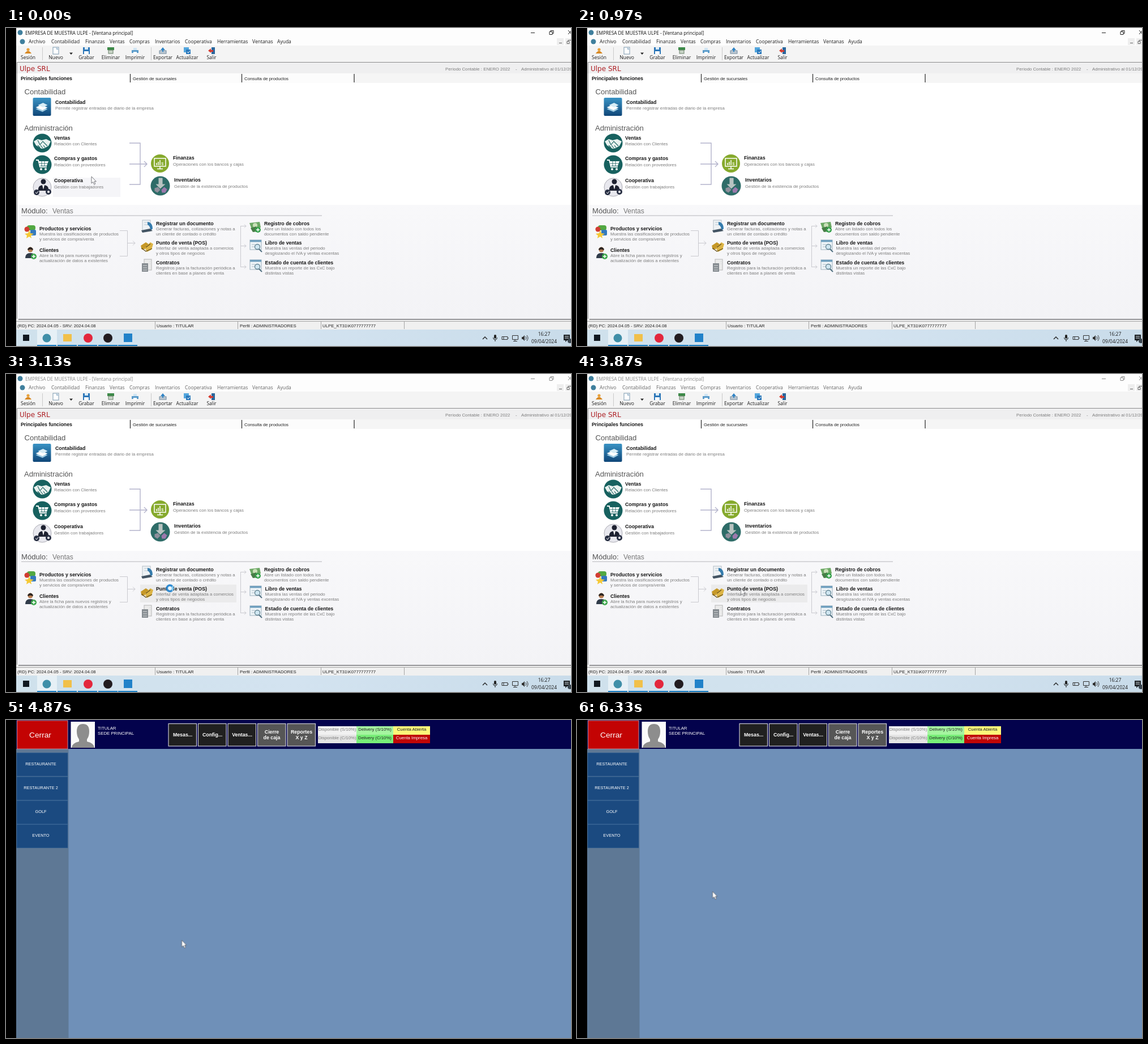
Write an HTML page that moves like this. It is 998 by 561 pixels and loops after 6.36 s.

```html
<!DOCTYPE html>
<html lang="es">
<head>
<meta charset="utf-8">
<title>Punto de venta</title>
<style>
html, body { margin: 0; width: 100%; height: 100%; overflow: hidden; background: #000; }
svg { display: block; width: 998px; height: 561px; }
text { font: 7.8px "Liberation Sans", Arial, sans-serif; fill: #222; white-space: pre; }
.ui { font: 8.5px "Open Sans", sans-serif; fill: #1c1c1c; }
.ttl { font: 8.25px "Open Sans", sans-serif; fill: #111; }
.off .ttl { fill: #8c8c8c; }
.off .ui { fill: #666; }
.b { font-weight: bold; font-size: 8.8px; fill: #161616; }
.d { fill: #7d7d7d; }
.h { font-size: 13.1px; fill: #555; }
.m { font-size: 12px; fill: #777; }
.co { font: 12px "DejaVu Sans", sans-serif; fill: #ad1f24; }
.w { fill: #fff; }
.c { text-anchor: middle; }
.big { font-size: 13.7px; }
.nav { font-size: 7.4px; }

.on { animation: 6360ms step-end infinite; }
#desk { animation-name: desk; }
#pos { animation-name: pos; }
#hot1 { animation-name: hot1; }
#hot2 { animation-name: hot2; }
#live { animation-name: live; }
#idle { animation-name: idle; }
#busy { animation-name: busy; }
#arrow { animation-name: arrow; }
#move { animation: move 6360ms linear infinite; }
#ring { animation: turn 1000ms linear infinite; }
@keyframes desk { 0% { visibility: visible } 61.8%, 100% { visibility: hidden } }
@keyframes pos { 0% { visibility: hidden } 61.8%, 100% { visibility: visible } }
@keyframes hot1 { 0% { opacity: 1 } 2.4%, 100% { opacity: 0 } }
@keyframes hot2 { 0% { opacity: 0 } 29.4%, 100% { opacity: 1 } }
@keyframes live { 0% { opacity: 1 } 42.4%, 100% { opacity: 0 } }
@keyframes idle { 0% { opacity: 0 } 42.4%, 100% { opacity: 1 } }
@keyframes busy { 0% { opacity: 0 } 37.1% { opacity: 1 } 57.4%, 100% { opacity: 0 } }
@keyframes arrow { 0% { opacity: 1 } 10.1% { opacity: 0 } 20.9% { opacity: 1 } 37.1% { opacity: 0 } 57.4%, 100% { opacity: 1 } }
@keyframes move {
  0%, .5% { transform: translate(151px, 262px); animation-timing-function: ease-in-out }
  10.1% { transform: translate(412px, 243px) }
  20.9% { transform: translate(372px, 318px); animation-timing-function: ease-out }
  31%, 62.6% { transform: translate(289.5px, 378px); animation-timing-function: ease-in-out }
  76.5%, 79% { transform: translate(310.5px, 388.5px); animation-timing-function: ease-in-out }
  99%, 100% { transform: translate(239.5px, 302.5px) }
}
@keyframes turn { to { transform: rotate(360deg) } }
</style>
</head>
<body>
<svg id="stage" viewBox="0 0 998 561">
<defs>
  <linearGradient id="blue" x2="0" y2="1"><stop stop-color="#3a93c4"/><stop offset="1" stop-color="#0f4678"/></linearGradient>
  <linearGradient id="task"><stop stop-color="#cfe1ec"/><stop offset=".5" stop-color="#d3e3f0"/><stop offset="1" stop-color="#c9dcea"/></linearGradient>
  <linearGradient id="low" x2="0" y2="1"><stop stop-color="#f8f8fa"/><stop offset="1" stop-color="#f3f3f6"/></linearGradient>
</defs>
</svg>
<script>
const rect = (x, y, w, h, fill, more = '') => `<rect x="${x}" y="${y}" width="${w}" height="${h}" fill="${fill}" ${more}/>`;
const dot = (x, y, r, fill, more = '') => `<circle cx="${x}" cy="${y}" r="${r}" fill="${fill}" ${more}/>`;
const shape = (d, fill, more = '') => `<path d="${d}" fill="${fill}" ${more}/>`;
const line = (d, color, w = 1) => shape(d, 'none', `stroke="${color}" stroke-width="${w}"`);
const text = (x, y, s, cls = '') => `<text x="${x}" y="${y}" class="${cls}">${s}</text>`;
const at = (x, y, s) => `<g transform="translate(${x} ${y})">${s}</g>`;
const group = (id, s, cls = '') => `<g id="${id}" class="on ${cls}">${s}</g>`;

// Bold heading with grey lines below
const entry = (x, y, head, ...rows) =>
  text(x, y, head, 'b') + rows.map((s, i) => text(x, y + (rows.length > 1 ? 9 + i * 9.5 : 10.5), s, 'd')).join('');

const sheet = rect(-5, -6, 10, 12, '#fff', 'stroke="#7d99b0"') + shape('M1 -6L5 -2H1Z', '#9db9cf');
const tools = [
  [39, 'Sesión', dot(0, -2, 2.6, '#e8a23c') + shape('M-6 5Q0 -4 6 5Z', '#d88924')],
  [88, 'Nuevo', sheet],
  [142, 'Grabar', rect(-6, -6, 12, 12, '#2d77b8') + rect(-3, -6, 6, 4, '#d9ebf7') + rect(-4, 1, 8, 5, '#fff')],
  [185, 'Eliminar', rect(-6, -6, 12, 5, '#3d8a48') + rect(-4, -1, 8, 6, '#c9d4c6', 'stroke="#68806a"')],
  [228, 'Imprimir', rect(-3, -5, 6, 4, '#cfe5f3') + rect(-6, -1, 12, 5, '#5c9cca') + rect(-3, 2, 6, 4, '#fff')],
  [277, 'Exportar', rect(-6, 0, 12, 5, '#bcc8d2', 'stroke="#72899c"') + shape('M-4 -1L0 -6L4 -1H1V2H-1V-1Z', '#2e83c5')],
  [320, 'Actualizar', rect(-6, -6, 9, 9, '#53a6dd') + rect(-2, -2, 8, 8, '#2b78bb') + line('M0 2L2 4L5 0', '#fff')],
  [363, 'Salir', rect(0, -6, 6, 12, '#2b679d') + shape('M-6 0L-1 -4V-1H3V2H-1V4Z', '#d83a2e')]
];

const menu = [[40, 'Archivo'], [80, 'Contabilidad'], [140, 'Finanzas'], [183, 'Ventas'], [218, 'Compras'], [263, 'Inventarios'],
  [316, 'Cooperativa'], [373, 'Herramientas'], [435, 'Ventanas'], [479, 'Ayuda']];

const caption = color =>
  text(34, 11.5, 'EMPRESA DE MUESTRA ULPE - [Ventana principal]', 'ttl') +
  line('M927 8.5H934M960 6.5H965V11.5H960ZM962 6.5V4.5H967V9.5H965M993 4L999 11M999 4L993 11', color) +
  menu.map(([x, s]) => text(x, 27, s, 'ui')).join('');

const header =
  rect(18, 0, 980, 31, '#fdfdfd') + rect(18, 31, 980, 29, '#f4f4f4') + rect(18, 60, 980, 20, '#efeff0') +
  rect(18, 80, 980, 17, '#f5f5f5') + rect(18, 80, 201, 17, '#fff') + rect(219, 80, 396, 17, '#fcfcfc') +
  dot(25, 8, 4.5, '#3f7f9d') + dot(29, 24, 4.5, '#3f7f9d') +
  group('live', caption('#222')) + group('idle', caption('#8c8c8c'), 'off') +
  rect(973, 18, 12, 12, '#eee') + rect(988, 18, 10, 12, '#eee') +
  line('M977 26.5H982M991 23.5H995V27.5H991ZM993 23V21.5H998', '#666') +
  tools.map(([x, s, icon]) => at(x, 40, icon) + text(x, 54.5, s, 'ui c')).join('') +
  shape('M112 43.5H118L115 47Z', '#222') + line('M64.5 34V57M256.5 34V57', '#c9c9c9') +
  text(24, 75.5, 'Ulpe SRL', 'co') +
  text(776, 74.5, 'Período Contable : ENERO 2022', 'd') + text(900, 74.5, '-', 'd') + text(910, 74.5, 'Administrativo al 01/12/2022', 'd') +
  text(26, 92, 'Principales funciones', 'b') + text(224, 92, 'Gestión de sucursales') + text(421, 92, 'Consulta de productos') +
  line('M219.5 81V96M416.5 81V96M615 81V96', '#333', 1.3);

const icons =
  rect(47.5, 123, 32, 32, 'url(#blue)', 'rx="2"') +
  at(63.5, 139, shape('M-11 4L-2 0L10 4L1 9Z', '#9fcbe2') + shape('M-11 1L-2 -3L10 1L1 6Z', '#fff') + shape('M-7 -3L2 -7L10 -3L2 1Z', '#d8edf6')) +
  at(64, 203, dot(0, 0, 16.5, '#17615f') + shape('M-15 -3L-8 -7L-1 -5L7 -7L15 -3L11 5L4 9L-1 10L-11 4Z', '#e9f1ef') +
    line('M-8 -5L-4 3L1 -3L9 5M-8 4L-4 8M-3 4L1 9M2 4L5 8', '#17615f', 1.1)) +
  at(64, 241, dot(0, 0, 16.5, '#17615f') + line('M-11 -8H-7L-4 4H8', '#fff', 1.8) + shape('M-7 -6H11L8 2H-4Z', '#fff') +
    line('M-6 -2H10M-1 -6V2M4 -6V2', '#17615f', .8) + dot(-2, 8, 2, '#fff') + dot(6, 8, 2, '#fff')) +
  at(64, 281, dot(0, 0, 16, '#e8e8ee', 'stroke="#aaaab2"') + dot(2, -10, 4.5, '#1d2130') + shape('M-7 6Q-8 -4 2 -4Q12 -4 11 6Z', '#1d2130') +
    shape('M0 -4H4L2 4Z', '#fff') + dot(-10, 9, 5, '#2a3145') + line('M-12 9L-10 11L-7 7', '#fff') + dot(11, 8, 5, '#2a3145') + dot(11, 8, 2, '#fff')) +
  at(272, 239, dot(0, 0, 16, '#86aa2d') + rect(-10, -9, 20, 14, 'none', 'stroke="#fff" stroke-width="1.5"') +
    line('M-6 3V-1M-3 3V-3M0 3V-6M0 5V9M-5 9.5H5', '#fff', 1.5) + text(2, 3, '$', 'w')) +
  at(272.5, 278.5, dot(0, 0, 17, '#2e6c68') + shape('M-3 -14H4V-3H9L0 5L-8 -3H-3Z', '#b8c3c1') +
    shape('M-10 4L-4 2L0 7L-5 12L-10 9Z', '#8f8f9c') + shape('M2 7L7 2L12 6L9 12L3 12Z', '#9c79ac')) +
  at(43, 359, rect(-6, -11, 15, 9, '#52a842', 'rx="4"') + rect(0, -3, 10, 10, '#3479bd', 'rx="2"') + dot(-6, -4, 4.5, '#d23c32') +
    shape('M-2 -2L0 3L6 4L1 7L2 12L-2 9L-7 12L-6 7L-10 4L-4 3Z', '#f5c936')) +
  at(43, 397, dot(0, -6, 4.5, '#b87c50') + shape('M-5 -7Q0 -14 5 -7L4 -5Q0 -8 -4 -5Z', '#282321') + shape('M-9 9Q-9 0 0 0Q9 0 9 9Z', '#303b49') +
    dot(6, 6, 5, '#3ba64a') + line('M3 6H9M6 3V9', '#fff', 1.5)) +
  at(249, 350, rect(-8, -11, 14, 19, '#eef2f5', 'stroke="#b3bec6"') + line('M-5 -7H2M-5 -3H2', '#b6c3cc') +
    shape('M1 -8Q10 -7 10 4L6 8Q6 -1 1 -3Z', '#357cad') + shape('M-10 7L5 4L10 8L-8 11Z', '#435463')) +
  at(249, 386, shape('M-11 -2L-2 -8L4 -4L-4 4L-9 5Z', '#c69827') + shape('M-4 2L6 -8L11 -5L8 5L0 9Z', '#dcb445') + line('M-10 2L-2 8L9 3M-2 1L6 -5', '#66501a', 1.2)) +
  at(249, 419, rect(-5, -11, 13, 19, '#ebebeb', 'stroke="#b5b5b5"') + rect(-9, -4, 11, 15, '#868c91') + line('M-7 0H0M-7 4H0M-7 8H0M4 -7H8M4 -3H8', '#d9dcde', 1.2)) +
  at(440, 351, shape('M-10 -7L8 -9L10 1L-6 4Z', '#6ca864') + dot(0, -3, 4, '#c9dfb8') + shape('M-8 2L2 -1L4 8L-4 9Z', '#487d47') + dot(5, 5, 5, '#35a14a') + line('M2 5H8M5 2V8', '#fff', 1.4)) +
  [384, 419].map(y => at(441, y, rect(-10, -10, 20, 17, '#eef4f8', 'stroke="#9aaebb"') + rect(-10, -10, 20, 3.5, '#6f9fbe') +
    line('M-7 -2H-1M-7 2H-1', '#a9bac5') + dot(3, 2, 4.5, '#cfe6f1', 'stroke="#60808f" stroke-width="1.3"') + line('M6 6L11 11', '#506f80', 2))).join('');

const content =
  rect(18, 97, 980, 215, '#fff') + rect(18, 312, 980, 202, 'url(#low)') +
  line('M998 60.5H19.5V514', '#8c8c8c') +
  group('hot1', rect(83, 264, 119, 34, '#f5f5f8')) + group('hot2', rect(237, 371.5, 170, 31.5, '#ebebec')) +
  text(32.5, 117, 'Contabilidad', 'h') + text(32, 181, 'Administración', 'h') +
  text(27, 326.5, 'Módulo:', 'h') + text(82, 326.5, 'Ventas', 'm') + line('M27 331H558', '#b5b5b9') +
  icons +
  entry(87, 133.5, 'Contabilidad', 'Permite registrar entradas de diario de la empresa') +
  entry(85, 196.5, 'Ventas', 'Relación con Clientes') +
  entry(85, 233, 'Compras y gastos', 'Relación con proveedores') +
  entry(85, 272.3, 'Cooperativa', 'Gestión con trabajadores') +
  entry(295, 232, 'Finanzas', 'Operaciones con los bancos y cajas') +
  entry(297, 271, 'Inventarios', 'Gestión de la existencia de productos') +
  entry(59, 356.5, 'Productos y servicios', 'Muestra las clasificaciones de productos', 'y servicios de compra/venta') +
  entry(59, 394.5, 'Clientes', 'Abre la ficha para nuevos registros y', 'actualización de datos a existentes') +
  entry(265, 347.5, 'Registrar un documento', 'Generar facturas, cotizaciones y notas a', 'un cliente de contado o crédito') +
  entry(265, 381.5, 'Punto de venta (POS)', 'Interfaz de venta adaptada a comercios', 'y otros tipos de negocios') +
  entry(265, 416.5, 'Contratos', 'Registros para la facturación periódica a', 'clientes en base a planes de venta') +
  entry(456, 347.5, 'Registro de cobros', 'Abre un listado con todos los', 'documentos con saldo pendiente') +
  entry(457.5, 381.5, 'Libro de ventas', 'Muestra las ventas del periodo', 'desglozando el IVA y ventas excentas') +
  entry(457.5, 416.5, 'Estado de cuenta de clientes', 'Muestra un reporte de las CxC bajo', 'distintas vistas') +
  line('M218 203H237V276H218M218 240H249M244 235L249 240L244 245', '#b3b3cb', 1.4) +
  line('M201 357.5H214.5V402.5H201M214 379.5H228M224 375.5L228 379.5L224 383.5', '#c9c9cf') +
  line('M414.5 349.5V421.5M414 349.5H424M414 384.5H424M414 421.5H424M421 346.5L424 349.5L421 352.5M421 381.5L424 384.5L421 387.5M421 418.5L424 421.5L421 424.5', '#c9c9cf');

const footer =
  rect(18, 513, 980, 19, '#f0f0f0') + line('M22 514H998', '#77777b', 1.4) +
  line('M263.5 518V531M409.5 518V531M556.5 518V531M703.5 518V531M18 517.5H998', '#a4a4a4') +
  text(20, 527.5, '(RD) PC: 2024.04.05 - SRV: 2024.04.08') + text(266, 527.5, 'Usuario : TITULAR') +
  text(413, 527.5, 'Perfil : ADMINISTRADORES') + text(559, 527.5, 'ULPE_KT31\\K0777777777') +
  rect(18, 532, 980, 29, 'url(#task)') + rect(55, 532, 35, 29, '#e6f0f6') +
  [55, 91, 127, 163, 198].map(x => rect(x, 559, 34, 2, '#1c7fc4')).join('') +
  rect(30, 541, 11, 11, '#101820') + dot(72, 547, 7.5, '#3f8fa8') + rect(101, 540, 15, 13, '#f1c04a') +
  dot(145, 547, 8, '#e3273d') + dot(180, 547, 8, '#221c20') + rect(208, 539, 15, 15, '#2182c9') +
  line('M842 549L846 545L850 549', '#222', 1.3) +
  rect(862, 541, 4, 7, '#222', 'rx="2"') + line('M860.5 546Q860.5 550 864 550Q867.5 550 867.5 546M864 550V553', '#222') +
  line('M876 544.5H886V549.5H876ZM886 547H888M879 544V550M894.5 542.5H904.5V549.5H894.5ZM899 550V552.5M896 552.5H903', '#333') +
  shape('M911 545H913L916 542V552L913 549H911Z', '#333') + line('M918 544Q920 547 918 550M920 542Q924 547 920 552', '#333') +
  text(950.5, 543, '16:27', 'ui c') + text(950.5, 555.5, '09/04/2024', 'ui c') +
  shape('M985 541H996V551H991L988 554V551H985Z', '#202428') + line('M987 544H994M987 547H994', '#dde8ef') + dot(996, 552, 4, '#3a4650');

const nav = ['RESTAURANTE', 'RESTAURANTE 2', 'GOLF', 'EVENTO'].map((s, i) =>
  rect(19, 58 + i * 42.2, 90, 41, '#1b4a80', 'stroke="#2b5d92" stroke-width=".7"') + text(61.5, 79.6 + i * 42.2, s, 'nav w c')).join('');

const keys = [['Mesas...'], ['Config...'], ['Ventas...'], ['Cierre', 'de caja'], ['Reportes', 'X y Z']].map((rows, i) => {
  const x = 287 + i * 52.5;
  return rect(x, 6.5, 49.5, 39.5, i < 3 ? '#202020' : '#565656', 'stroke="#c9c9d0" stroke-width="1.2"') +
    rows.map((s, j) => text(x + 25, (rows.length > 1 ? 24 : 29) + j * 10, s, 'b w c')).join('');
}).join('');

const legend = [
  [551, 68, ['#f1f1f1', '#e4e4e4'], ['Disponible (S/10%)', 'Disponible (C/10%)'], ['d', 'd']],
  [619, 65, ['#a5f5a0', '#78ee78'], ['Delivery (S/10%)', 'Delivery (C/10%)'], ['', '']],
  [684, 65, ['#fbf779', '#c00606'], ['Cuenta Abierta', 'Cuenta Impresa'], ['', 'w']]
].map(([x, w, fills, rows, cls]) => rows.map((s, i) =>
  rect(x, 11 + i * 15, w, 15, fills[i]) + text(x + w / 2, 19.3 + i * 14.7, s, 'c ' + cls[i])).join('')).join('');

const pos =
  rect(18, 0, 980, 561, '#6f90b8') + rect(18, 51, 92.5, 510, '#5e7895') + rect(18, 0, 980, 51, '#03024c') +
  rect(19.5, 1, 89.5, 50, '#c30303', 'stroke="#b98c9c"') + text(60.5, 31, 'Cerrar', 'big w c') +
  rect(114.5, 3, 42.5, 46, '#fafafa') +
  shape('M116 49Q116 41 129 38V34Q125 29 125 20Q125 7 136 7Q147 7 147 20Q147 29 143 34V38Q156 41 156 49Z', '#8d8d8d') +
  text(162, 16.8, 'TITULAR', 'w') + text(162, 26, 'SEDE PRINCIPAL', 'w') +
  keys + legend + nav;

const pointer =
  `<g id="move">` +
  group('arrow', shape('M0 0V12L2.8 9.5L4.8 14L6.8 13L4.9 8.8H8.3Z', '#fff', 'stroke="#55565c" stroke-width=".8"')) +
  group('busy', `<g id="ring">${dot(0, 0, 5.3, '#e9f6fd', 'stroke="#2786cf" stroke-width="3.4"')}` +
    line('M0 -5.3A5.3 5.3 0 0 1 5.3 0', '#7cc7f2', 3.4) + '</g>') + '</g>';

document.getElementById('stage').insertAdjacentHTML('beforeend',
  rect(0, 0, 998, 561, '#000') + group('desk', header + content + footer) + group('pos', pos) + pointer);
</script>
</body>
</html>
```
